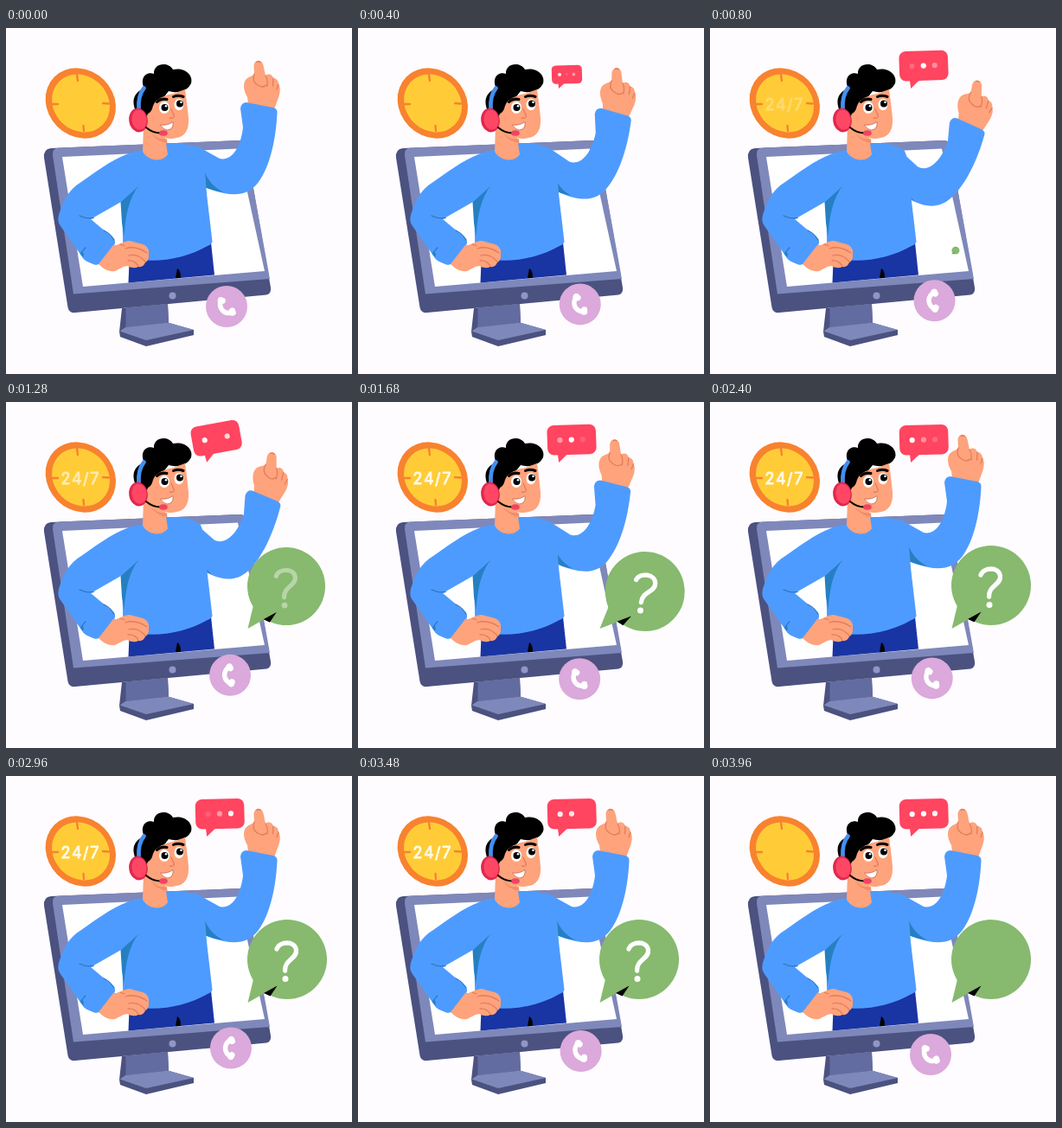
These frames come from a looping animation (400x400 px, 4000 ms). An HTML page:

```html
<!DOCTYPE html>
<html lang="en">
<head>
<meta charset="utf-8">
<title>Support desk</title>
<style>
html, body { margin: 0; width: 100%; height: 100%; overflow: hidden; background: #fefcff; }
svg { display: block; width: 100%; height: 100%; }
.skin { fill: #fea37b; }
.blue { fill: #4e9bff; }
.shade { fill: #2580c2; }
.dark { fill: #4b5280; }
.light { fill: #7f88ba; }
.line { fill: none; stroke-linecap: round; stroke-linejoin: round; }
.fold { stroke: #2877c4; stroke-width: 1.3; }
.crease { stroke: #e27d5e; stroke-width: 1.3; }
.ink { stroke: #000; }
.white { stroke: #fff; }
</style>
</head>
<body>
<svg viewBox="0 0 400 400">
  <g id="clock">
    <ellipse cx="86.3" cy="87" rx="43" ry="38.2" transform="rotate(45 86.3 87)" fill="#f8822f"/>
    <ellipse cx="86.5" cy="87" rx="35.5" ry="31.3" transform="rotate(45 86.5 87)" fill="#ffcc38"/>
    <path class="line" stroke="#f8822f" stroke-width="2.4" d="M82 54L83 61M53 88L60 88M112 87L119 87.5M89.5 113L90 119"/>
    <text id="hours" x="86.3" y="94.5" text-anchor="middle" font-family="Inter, 'Open Sans', sans-serif" font-size="18" letter-spacing="1.6" fill="#fffbe8" stroke="#fffbe8" stroke-width=".9" stroke-linejoin="round">24/7</text>
  </g>

  <g id="monitor">
    <path class="dark" d="M52 139L270 130Q276 130 277 135L306 300Q307 307 301 308.5L80 329Q73 330 71.500 323L44 150Q43 140 52 139Z"/>
    <path class="light" d="M61 138.6L270 130Q276 130 277 135L305 290L78 307.5L54 147Q53 139 61 138.6Z"/>
    <path fill="#fff" d="M65 149L268 139.5L299 281L89 299Z"/>
    <circle cx="192.5" cy="309.500" r="4" fill="#8f97c6"/>
    <path class="dark" d="M134 324L187 319L188 341L217 349V355L162 368L132 357L131 351Z"/>
    <path fill="#636ca0" d="M138.5 323.500L187 319L188 340.5L138.500 346Z"/>
    <path class="light" d="M138 346L188 340.5L217 349L162 361L131.500 350.5Z"/>
  </g>

  <g id="chat">
    <g transform="rotate(-1.500 247 43.500)">
      <rect x="219" y="26.500" width="56.500" height="34.500" rx="7.500" fill="#ff4560"/>
      <path fill="#ff4560" d="M230.500 59L231.500 69.500L242 60Z"/>
      <g id="dots" fill="#fff">
        <circle cx="233.700" cy="43.700" r="3.100"/>
        <circle cx="247" cy="43.700" r="3.100"/>
        <circle cx="260" cy="43.700" r="3.100"/>
      </g>
    </g>
  </g>

  <path fill="#1934a3" d="M143 258L237 248L241 285.500L141.500 294.500Z"/>
  <path fill="#000" d="M198 278Q202 280 202 288.800L196 289.300Z"/>

  <g id="arm">
    <path class="skin" d="M281 95L279 80C275 73 273.500 65 277 60C280 56 285 56 287 53L286.500 44C287 36 296 36 297.500 43L300 55C304 52 308 54 309 58C313 58 315 61.500 315 65C317.500 68 317 74 315.500 79L309 97Z"/>
    <path class="line crease" d="M287 53Q284 62 291 66Q297 70 301 66M300 55Q303 60 302 67M309 58L308.500 67M315 65L313 71M290 39.500Q292 38 294 39.500"/>
    <path class="blue" d="M203 134L222 137L247 151C260 154 271 140 274 115L271 93Q272 86 278 86L309 92Q314 93.500 313.500 98C312 130 305 160 292 178C282 192 268 194 252 191C243 189 236 187 228 183L200 168Z"/>
    <path class="shade" d="M227 156C230 173 238 183 252 190Q240 188 229 184Z"/>
  </g>

  <g id="body">
    <path class="blue" d="M158 141L187 134C205 132 216 135 225 142C231 155 230 175 233 200L238.500 247Q238 250 233 252C205 268 170 273 138 265Q135 264 135.500 260L134 205L120 160Z"/>
    <path class="shade" d="M132.500 201L154 182C143 195 138.500 213 136.500 240L134 225Z"/>
    <path class="blue" d="M163 141C141 142 125 152 104 166L87 178C72 187 66 200 61 216Q59 224 63 229L87 263Q90 269 96 271L102 273.500Q107 275 110 270L125 251Q128 246 123 242L98 221L133 201L154 182Z"/>
    <path class="line fold" d="M85 217Q93 221 101 219.500M113 234Q121 238 125 245M87 262Q89 256 92 254"/>
    <path class="shade" d="M86 261Q87 255 90 262L89 265Z"/>
    <path class="skin" d="M107 273L124 251C130 252 136 246 143 246L158 250Q164 252 165 258L165 265Q164 270 161 271Q159 277 153 276Q148 279 140 275C134 276 131 279 126 281Q117 283 107 273Z"/>
    <path class="line crease" d="M138 255Q150 251 163 260M142 263Q152 260 161 270M141 269Q148 268 153 275M132 250L137 252"/>
  </g>

  <g id="head">
    <path fill="#000" d="M151 98C144 84 148 74 160 70C154 58 162 50 171 53C170 41 187 38 193 48C206 45 217 54 214 64C210 73 198 76 188 73L173 92L166 102H156Z"/>
    <path class="skin" d="M159 112L164 99Q168 98 170 90C173 82 180 80 188 77C196 76 203 72 207 71L209 86L211 104C212 117 207 126 197 127Q190 129 184 127L187 146C182 155 165 155 158 143Z"/>
    <path fill="#f18d6b" d="M167 121Q176 130 186 128L186.500 133Q174 131 167 121Z"/>
    <path class="line" stroke="#438fee" stroke-width="4.800" d="M159.500 69.500Q152.500 78 153.500 94"/>
    <ellipse cx="153" cy="106.500" rx="10.800" ry="14" fill="#df294e" transform="rotate(-8 153 106.500)"/>
    <ellipse cx="154" cy="106" rx="8.500" ry="11.500" fill="#ff4665" transform="rotate(-8 154 106)"/>
    <path class="line ink" stroke-width="2" d="M162 115Q169 121 178 121.500"/>
    <ellipse cx="182" cy="121.500" rx="4.800" ry="3.300" fill="#f04465"/>
    <ellipse cx="183" cy="92" rx="6" ry="7" fill="#fff"/>
    <ellipse cx="200" cy="88.500" rx="5.500" ry="6.700" fill="#fff"/>
    <g fill="#000"><circle cx="183.500" cy="92" r="4"/><circle cx="201" cy="87.500" r="4"/></g>
    <g fill="#fff"><circle cx="185" cy="90.300" r="1.300"/><circle cx="202.500" cy="85.800" r="1.300"/></g>
    <path class="line ink" stroke-width="3" d="M174.500 85.500Q179 81 186 82.500M193.500 79.500Q199 77 205 79.500"/>
    <path class="line crease" d="M191 94L194.500 102Q194 105 189.500 104"/>
    <path fill="#fff" stroke="#bd5648" stroke-width=".7" d="M178.500 112Q187 113 193 108.500Q194 117 187 118Q182 118 178.500 112Z"/>
  </g>

  <g id="ask">
    <path fill="#87b96e" d="M286 235L279.500 262L306 247Z"/>
    <circle cx="325" cy="212" r="46" fill="#87b96e"/>
    <path fill="#000" d="M298 251L313.500 242.500L305.500 254.500Z"/>
    <g id="mark">
      <path class="line white" stroke-width="5.300" d="M313 200C316 191 334 190 335.500 201C337 211 322 212 322.500 225"/>
      <circle cx="323" cy="234.500" r="3.500" fill="#fff"/>
    </g>
  </g>

  <g id="phone">
    <circle r="24" fill="#dba9db"/>
    <g id="handset">
      <path class="line white" stroke-width="5.500" d="M1 -10.500C-9 -5 -9 5 1 10.500"/>
      <path class="line white" stroke-width="7" d="M0 -10L1.300 -8M0 10L1.300 8"/>
    </g>
  </g>
</svg>
<script>
const LOOP = 4000;
const $ = id => document.getElementById(id);
const part = {};
for (const id of ['hours', 'chat', 'arm', 'ask', 'mark', 'phone', 'handset']) part[id] = $(id);
const dots = [...$('dots').children];

const clamp = x => Math.max(0, Math.min(1, x));
const ramp = (t, a, b) => clamp((t - a) / (b - a));
const pop = (t, a, b) => Math.sin(ramp(t, a, b) * Math.PI / 2);
const swing = (t, a, b) => Math.sin(ramp(t, a, b) * Math.PI) ** 2;
const place = (el, value) => el.setAttribute('transform', value);
const fade = (el, value) => el.setAttribute('opacity', value.toFixed(3));

// Grow and tilt a bubble about the tip of its tail.
function bubble(el, x, y, scale, angle) {
  el.style.display = scale > 0 ? '' : 'none';
  place(el, `translate(${x} ${y}) rotate(${angle}) scale(${scale}) translate(${-x} ${-y})`);
}

function draw(t) {
  place(part.arm, `rotate(${14.5 * swing(t, 0, 2000)} 202 127)`);

  const u = (1 - Math.cos(t * Math.PI / 1000)) / 2;
  place(part.phone, `translate(${255 + 5 * u} ${322 - 7.5 * u})`);
  place(part.handset, `rotate(${-44 + 46 * u})`);

  bubble(part.chat, 232, 70, pop(t, 150, 740), -8.8 * swing(t, 720, 1760));
  bubble(part.ask, 279.5, 262, pop(t, 764, 1360), 11 * swing(t, 1320, 2400));

  const settle = ramp(t, 3500, 3800);
  dots.forEach((dot, i) => {
    const wave = Math.cos(2 * Math.PI * (t / 960 - 0.47 - i / 3));
    fade(dot, Math.max(settle, clamp(0.58 + 0.58 * wave)));
  });

  const out = 1 - ramp(t, 3560, 3960);
  fade(part.hours, ramp(t, 400, 1680) * out);
  fade(part.mark, ramp(t, 1040, 1640) * out);
}

const start = performance.now();
function tick() {
  draw((performance.now() - start) % LOOP);
  requestAnimationFrame(tick);
}
tick();
</script>
</body>
</html>
```
